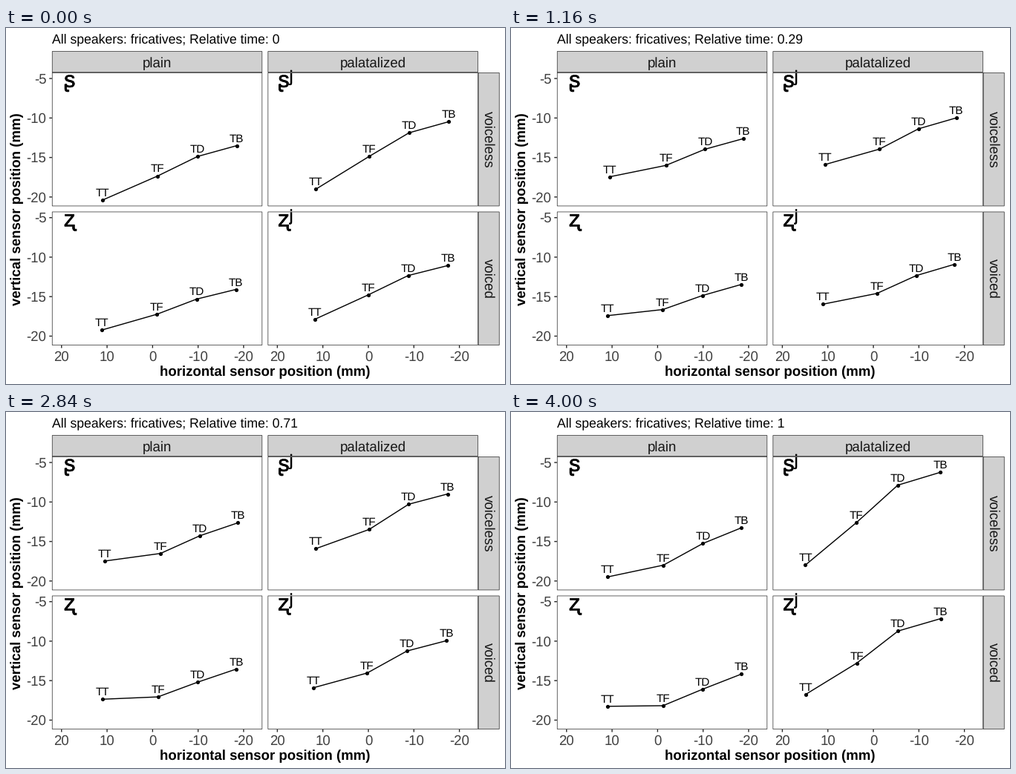
Write a matplotlib script that moves like this. It is 672 px wide and 480 px high and loops after 4040 ms.

```python
import numpy as np
import matplotlib.pyplot as plt
from matplotlib.animation import FuncAnimation
from matplotlib.patches import Rectangle
from matplotlib.patheffects import withStroke

W, H, DPI = 672, 480, 72  # at 72 dpi one point is one pixel
FRAMES, INTERVAL = 101, 40

plt.rcParams["font.family"] = ["Liberation Sans", "DejaVu Sans"]
plt.rcParams["text.hinting"] = "none"

STRIP, LINE, STRIP_TEXT, TICK_TEXT = "#d0d0d0", "#282828", "#161616", "#404040"
LEFT, RIGHT, TOP, BOTTOM = 61.9, 352.5, 60, 247.6
PANEL_W, PANEL_H, STRIP_H, EDGE = 283.3, 180.3, 28.8, 0.71

# One value per sensor: onset time constant, release power, share of the sway
SENSORS = ["TT", "TF", "TD", "TB"]
TAU = np.array([.14, .12, .12, .18])
POWER = np.array([5, 3.4, 3.4, 4])
SWAY_IN = np.array([.75, 1, .8, .5])
SWAY_OUT = np.array([.85, 1, .9, .7])
PLAIN_GAPS = np.array([0, 74.3, 128, 180.8])
PALATAL_GAPS = np.array([0, 71.5, 125.5, 179])


def tongue(x, sway_in, sway_out, start, hold, end):
    """Settle from the start pose into the hold, then release to the end pose."""
    start, hold, end = map(np.array, (start, hold, end))

    def at(t):
        onset = 1 - np.exp(-t / TAU)
        px = x + sway_in * SWAY_IN * onset + sway_out * SWAY_OUT * t ** 4
        py = start + (hold - start) * onset + (end - hold) * t ** POWER
        return px, py

    return at


tongues = [
    tongue(130 + PLAIN_GAPS, 4.7, -3.8, [232, 199.5, 173.2, 158.6],
           [196, 183.5, 162.2, 146.8], [222.3, 206.5, 177.3, 156]),
    tongue(417.3 + PALATAL_GAPS, 8.5, -32, [217.3, 173.3, 141.3, 126.3],
           [179.3, 162.5, 136, 120.3], [206.3, 149, 98.7, 81.3]),
    tongue(128.8 + PLAIN_GAPS, 1.5, 0, [407.3, 386, 365.5, 352.5],
           [385, 378.7, 360, 344], [396.8, 396, 373.8, 353.3]),
    tongue(416 + PALATAL_GAPS, 6, -27.8, [392.7, 360, 333.8, 320.3],
           [369.5, 358, 334.5, 318.5], [380.7, 338.5, 295.3, 278.6]),
]

fig = plt.figure(figsize=(W / DPI, H / DPI), dpi=DPI, facecolor="white")
ax = fig.add_axes([0, 0, 1, 1])
ax.set(xlim=(0, W), ylim=(H, 0))
ax.axis("off")


def text(x, y, s, size=18.67, ha="center", va="baseline", **kw):
    return ax.text(x, y, s, fontsize=size, ha=ha, va=va, **kw)


def box(x, y, w, h, fill):
    """Filled box whose border lies fully inside its edges."""
    rect = Rectangle((x + EDGE / 2, y + EDGE / 2), w - EDGE, h - EDGE,
                     fc=fill, ec=LINE, lw=EDGE, snap=False)
    return ax.add_patch(rect)


def tick(x, y, dx, dy):
    ax.plot([x, x + dx], [y, y + dy], color=LINE, lw=1.42,
            solid_capstyle="butt", snap=False)


for x, name in [(LEFT, "plain"), (RIGHT, "palatalized")]:
    box(x, TOP - STRIP_H, PANEL_W, STRIP_H, STRIP)
    text(x + PANEL_W / 2, 53, name, color=STRIP_TEXT)
    for k in range(5):
        tx = x + 12.9 + 61.3 * k
        tick(tx, BOTTOM + PANEL_H, 0, 3.6)
        text(tx, 448.5, str(20 - 10 * k), color=TICK_TEXT)

for y, name, letter in [(TOP, "voiceless", "ʂ"), (BOTTOM, "voiced", "ʐ")]:
    box(RIGHT + PANEL_W, y, STRIP_H, PANEL_H, STRIP)
    text(649, y + PANEL_H / 2, name, color=STRIP_TEXT, rotation=270, va="center")
    for k in range(4):
        ty = y + 8.1 + 53.25 * k
        tick(LEFT - 3.6, ty, 3.6, 0)
        text(54.5, ty + 6.6, str(-5 - 5 * k), ha="right", color=TICK_TEXT)
    for x, dx, symbol in [(LEFT, 16.3, letter), (RIGHT, 14, letter + "ʲ")]:
        panel = box(x, y, PANEL_W, PANEL_H, "white")
        text(x + dx, y + 19.7, symbol, size=30.3, ha="left",
             path_effects=[withStroke(linewidth=.6, foreground="black")]
             ).set_clip_path(panel)

text(348.7, 469, "horizontal sensor position (mm)", weight="bold")
text(15.5, 244, "vertical sensor position (mm)", weight="bold",
     rotation=90, va="center")
title = text(61.5, 20, "", size=17.6, ha="left")

lines = [ax.plot([], [], "k-o", lw=1.42, ms=5.2, mew=0)[0] for _ in tongues]
labels = [[text(0, 0, s, size=15.2) for s in SENSORS] for _ in tongues]


def update(frame):
    t = frame / (FRAMES - 1)
    title.set_text(f"All speakers: fricatives; Relative time: {t:g}")
    for pose, line, names in zip(tongues, lines, labels):
        xs, ys = pose(t)
        line.set_data(xs, ys)
        for x, y, name in zip(xs, ys, names):
            name.set_position((x, y - 5))
    return [title, *lines, *sum(labels, [])]


anim = FuncAnimation(fig, update, frames=FRAMES, interval=INTERVAL,
                     repeat=True, repeat_delay=0)
plt.show()
```
